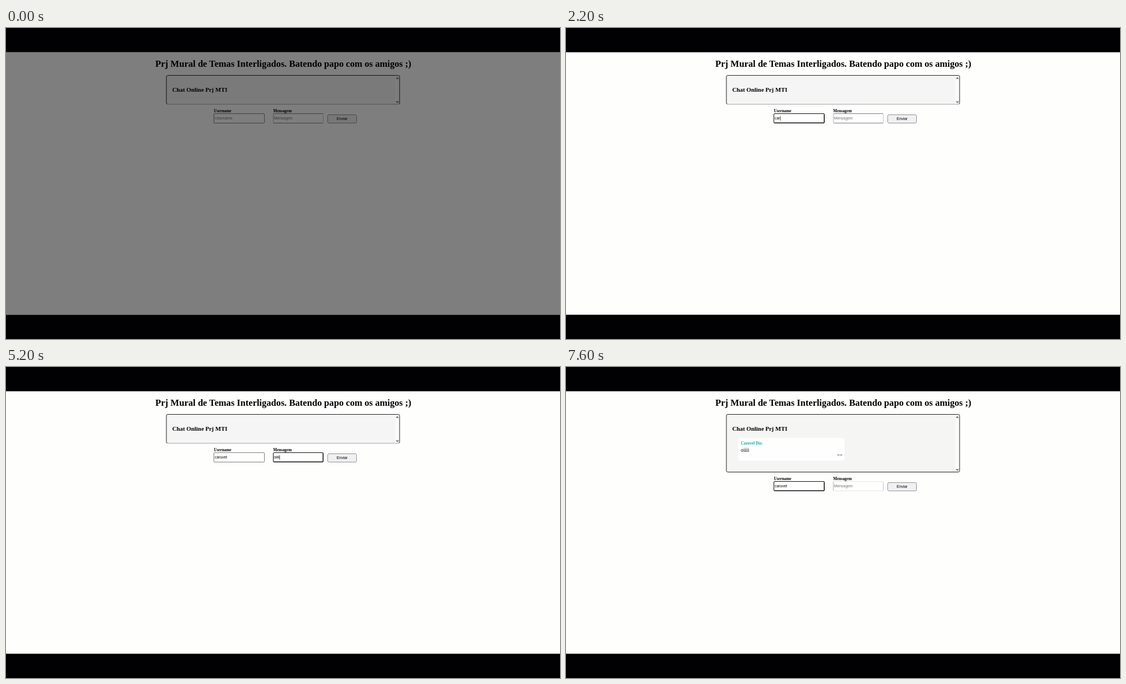
Write an HTML page that moves like this. It is 998 px wide and 561 px high and loops after 8000 ms.

```html
<!DOCTYPE html>
<html lang="pt-BR">
<head>
<meta charset="utf-8">
<title>Chat</title>
<style>
  html, body { margin: 0; width: 100%; height: 100%; overflow: hidden; background: #010103; }
  #stage { position: relative; width: 998px; height: 561px; overflow: hidden; }
  #stage div { position: absolute; box-sizing: border-box; }
  svg { position: absolute; left: 0; top: 0; width: 998px; height: 561px; overflow: visible; }
  text { font-family: "Liberation Serif", "Times New Roman", serif; fill: #000; white-space: pre; }
  .bold { font-weight: 700; }
  .title { font-size: 16.63px; text-anchor: end; }
  .sub { font-size: 10.85px; }
  .label { font-size: 7.28px; }
  .ui { font: 6.93px "Liberation Sans", Arial, sans-serif; }
  .hint { fill: #757575; }

  #page, #veil { left: 0; top: 44px; width: 998px; height: 473px; }
  #page { background: #fefefd; box-shadow: 0 0 0 1px #404040; }
  #veil { background: rgba(0, 0, 0, .5); }
  #chat { left: 289px; top: 86px; width: 420px; height: 51px; background: #f6f5f5; overflow: hidden; }
  #bar { right: 0; top: 0; bottom: 0; width: 8px; background: #fbfbfb; }
  .arrow { left: 1px; border: 3px solid transparent; }
  #bar .up { top: 0; border-bottom: 4px solid #888; border-top-width: 2px; }
  #bar .down { bottom: 0; border-top: 4px solid #888; border-bottom-width: 1px; }
  #frame { x: 288.95px; y: 85.5px; width: 420.1px; height: 52px; rx: 2.5px; fill: none; stroke: #1c1c1c; }
  #bubble { left: 310px; top: 128px; width: 192px; height: 41px; background: #fefefe; border-radius: 5px; }

  #form { left: 0; top: 0; width: 998px; height: 561px; }
  .field { top: 154px; width: 91px; height: 18px; background: #fefefe; border: 1px solid #7c7c7c; border-radius: 2px; }
  #user { left: 374px; width: 92px; }
  #msg { left: 481px; border-left-color: #b4b4b4; border-right-color: #c4c4c4; }
  #send { left: 579px; top: 156px; width: 53px; height: 16px; background: #f0f0f2;
          border: 1px solid #929296; border-radius: 3px; }

  .sent #chat { height: 103px; background: #f5f5f4; }
  .sent #frame { height: 104px; }
  .sent #fade { visibility: hidden; }
  .sent #form { top: 52px; }
  .sent .field { border-top-color: #e6e6e6; border-bottom-color: #e6e6e6; }
  #stage .field.focus { border-color: #0a0a0a; box-shadow: inset -.5px -.5px 0 #0a0a0a; }
  #stage:not(.sent) .reply { visibility: hidden; }
</style>
</head>
<body>
<div id="stage">
  <div id="page"></div>
  <div id="chat"><div id="bar"><div class="arrow up"></div><div class="arrow down"></div></div></div>
  <div id="bubble" class="reply"></div>
  <svg>
    <rect id="frame"/>
    <path id="fade" d="M290 137.5H708" stroke="#a6a6a6"/>
    <text class="bold title" x="730" y="69.6">Prj Mural de Temas Interligados. Batendo papo com os amigos ;)</text>
    <text class="bold sub" x="299.5" y="114.8">Chat Online Prj MTI</text>
    <g class="reply">
      <text class="bold label" x="315" y="140" style="fill:#1aa39a">Caruvel Diz:</text>
      <text x="315" y="153" style="font-size:9.36px">oiiii</text>
      <text x="497.3" y="159.5" style="font-size:3.8px;text-anchor:end">16:14</text>
    </g>
  </svg>
  <div id="form">
    <div id="user" class="field"></div>
    <div id="msg" class="field"></div>
    <div id="send"></div>
    <svg>
      <text class="bold label" x="374.5" y="152">Username</text>
      <text class="bold label" x="481.2" y="152">Mensagem</text>
      <text class="ui" id="userText" x="376" y="165.3"></text>
      <text class="ui" id="msgText" x="482.4" y="165.3"></text>
      <text class="ui" x="595.7" y="166.3">Enviar</text>
      <rect id="caret" y="159" width=".7" height="8"/>
    </svg>
  </div>
  <div id="veil"></div>
</div>
<script>
  const LOOP = 8000, NAME = "caruvel", MESSAGE = "oiiii";
  const $ = id => document.getElementById(id);

  // Each entry: [start time, typed letters], in order.
  const nameKeys = [[1800, 2], [2200, 3], [2400, 4], [2600, 6], [3000, 7]];
  const messageKeys = [[4400, 1], [4600, 2], [4800, 3], [5000, 4], [5200, 5], [5600, 0]];
  const typed = (keys, t) => keys.reduce((n, [at, count]) => t >= at ? count : n, 0);
  const within = (t, from, to) => t >= from && t < to;

  function fill(node, value, hint) {
    const text = value || hint;
    if (node.textContent !== text) node.textContent = text;
    node.classList.toggle("hint", !value);
  }

  function placeCaret(t, node, value) {
    const visible = within(t, 800, 1200) || within(t, 1800, 3000) ||
                    within(t, 3400, 3800) || within(t, 4400, 5600);
    const width = value ? node.getComputedTextLength() : 0;
    $("caret").setAttribute("x", +node.getAttribute("x") + width + .2);
    $("caret").style.visibility = visible ? "visible" : "hidden";
  }

  function draw() {
    const t = performance.now() % LOOP;
    const name = NAME.slice(0, typed(nameKeys, t));
    const message = MESSAGE.slice(0, typed(messageKeys, t));
    const onUser = within(t, 800, 3400) || t >= 7200;
    const onMessage = within(t, 3400, 7200);

    $("veil").style.visibility = t < 200 ? "visible" : "hidden";
    $("stage").classList.toggle("sent", t >= 5600);
    $("user").classList.toggle("focus", onUser);
    $("msg").classList.toggle("focus", onMessage);
    fill($("userText"), name, "Username");
    fill($("msgText"), message, "Mensagem");
    placeCaret(t, onMessage ? $("msgText") : $("userText"), onMessage ? message : name);
    requestAnimationFrame(draw);
  }
  draw();
</script>
</body>
</html>
```
